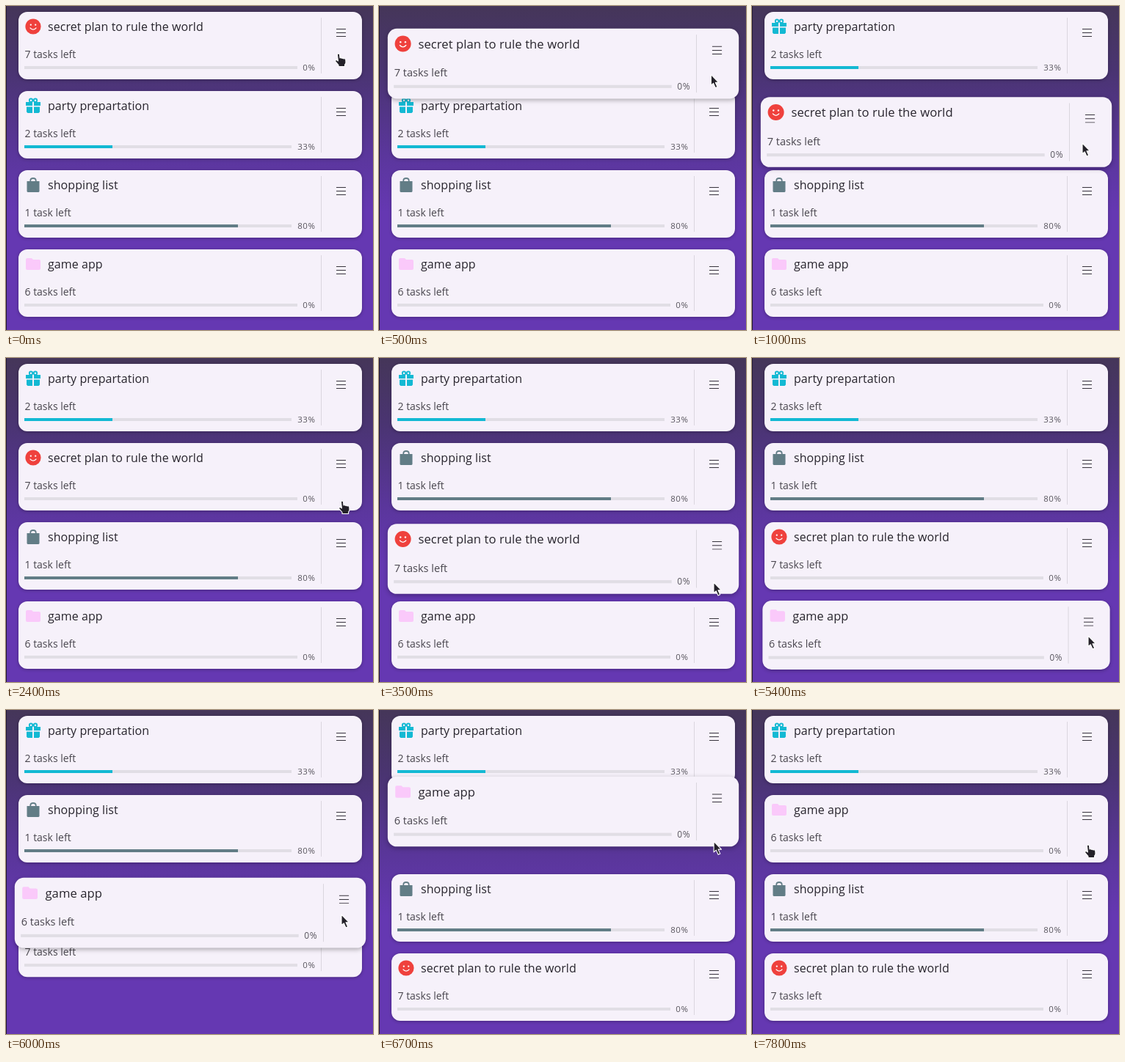
Recreate the animation shown at these times as an HTML page. Size 500 px wide and 442 px high, loop 7900 ms.

```html
<!DOCTYPE html>
<html lang="en">
<head>
<meta charset="utf-8">
<title>Reordering lists</title>
<style>
  html, body { margin: 0; width: 100%; height: 100%; overflow: hidden; }
  #stage {
    position: relative; width: 500px; height: 442px; overflow: hidden;
    font-family: "Open Sans", "Noto Sans", sans-serif;
    background: linear-gradient(#453659, #4a3472 90px, #5a369b 200px, #6538b2 280px, #6538b2);
  }
  #stage::before { content: ""; position: absolute; inset: 0 auto 0 0; width: 1px; background: #1f1733; }
  .card {
    position: absolute; top: 0; height: 92px; border-radius: 12px;
    background: #f6f1fa; white-space: nowrap;
  }
  .card > * { position: absolute; }
  .icon { left: 8px; top: 8px; width: 24px; height: 24px; fill: var(--tint); }
  .line { fill: none; stroke: var(--tint); stroke-width: 1.8; }
  .title { left: 40px; top: 0; font-size: 16px; line-height: 40px; letter-spacing: .06px; color: #28252d; }
  .left { left: 8.5px; top: 47px; font-size: 14px; line-height: 21px; color: #49464e; }
  .track { left: 8px; right: var(--end); top: 74px; height: 4px; background: #e1dee5; }
  .fill { height: 100%; width: var(--done); background: var(--tint); }
  .pct { right: 63.4px; top: 68px; font-size: 11.5px; line-height: 16px; letter-spacing: .6px; color: #59565e; }
  .rule { right: 55px; top: 8px; width: 1px; height: 76px; background: #dad6de; }
  .menu { right: 22px; top: 22px; width: 13px; height: 12px; stroke: #38353d; }
  #cursor { position: absolute; left: 0; top: 0; z-index: 5; overflow: visible; }
  #cursor path { fill: #242129; stroke: #fff; stroke-width: 1.1; stroke-linejoin: round; }
</style>
</head>
<body>
<div id="stage">
  <svg id="cursor" width="1" height="1">
    <path id="hand" d="M-1.6 1Q0-1 1.5 1L2 6Q3.3 4.9 4.5 6.4Q6 5.5 7 7Q9 6.2 9.8 8.2L10 12Q9.8 14 8.6 15V17.5H0V15.5L-4 10.8Q-4.8 8.6-2.7 8.4L-.6 10Z"/>
    <path id="arrow" d="M0 0V14.6L3.2 11.8L6 18L8.7 16.8L6 10.8H10.4Z"/>
  </svg>
</div>
<script>
const LOOP = 7900, STEP = 100;
const TOP = 8, PITCH = 108;
const LIFT = 200, SWAP = 345;

const icons = {
  smile: `<circle cx="12" cy="12" r="10.6"/>
    <g fill="#fff"><circle cx="8.8" cy="9.7" r="1.15"/><circle cx="15.2" cy="9.7" r="1.15"/></g>
    <path d="M7.6 13.6Q12 18.8 16.4 13.6" fill="none" stroke="#fff" stroke-width="1.3"/>`,
  gift: `<path d="M2 7H11V12H2ZM13 7H22V12H13ZM3 13.5H11V22H4.5L3 20.5ZM13 13.5H21V20.5L19.5 22H13Z"/>
    <circle class="line" cx="9" cy="4.7" r="2.2"/><circle class="line" cx="15" cy="4.7" r="2.2"/>`,
  bag: `<path d="M3.5 7H20.5V21L19.5 22H4.5L3.5 21Z"/>
    <path class="line" d="M8.3 8V6Q8.3 3 12 3T15.7 6V8"/>`,
  folder: `<path d="M4 4H10L12 6H20Q22 6 22 8V18Q22 20 20 20H4Q2 20 2 18V6Q2 4 4 4Z"/>`
};

const cards = {
  party: { slot: 1, icon: "gift", title: "party prepartation", left: "2 tasks left", done: 33, tint: "#13b9d3" },
  shopping: { slot: 2, icon: "bag", title: "shopping list", left: "1 task left", done: 80, tint: "#627d86" },
  secret: { slot: 0, icon: "smile", title: "secret plan to rule the world", left: "7 tasks left", done: 0, tint: "#ef413d" },
  game: { slot: 3, icon: "folder", title: "game app", left: "6 tasks left", done: 0, tint: "#fac9fa" }
};

// A dragged card overshoots its slot by `over` pixels and settles when dropped.
const drags = [
  { card: "secret", by: 1, start: 300, dur: 680, over: 10, drop: 1400 },
  { card: "secret", by: 1, start: 2600, dur: 600, over: 4, drop: 3600 },
  { card: "game", by: -2, start: 5500, dur: 1115, over: -23.5, drop: 7300 }
];

// Cards that step aside for a dragged one.
const swaps = [
  { card: "party", by: -1, start: 550 },
  { card: "shopping", by: -1, start: 2850 },
  { card: "secret", by: 1, start: 5840 },
  { card: "shopping", by: 1, start: 6150 }
];

const path = [
  { t: 0, x: 453, y: 65 }, { t: 300, x: 453, y: 69 }, { t: 980, x: 450, y: 187 },
  { t: 2400, x: 458, y: 195 }, { t: 2600, x: 458, y: 195 }, { t: 3200, x: 456, y: 306 },
  { t: 3700, x: 456, y: 306 }, { t: 4500, x: 423, y: 366 }, { t: 4900, x: 458, y: 379 },
  { t: 5500, x: 458, y: 379 }, { t: 6500, x: 456, y: 179 }, { t: 7800, x: 458, y: 184 }
];

function ease(t, start, dur) {
  const p = Math.min(1, Math.max(0, (t - start) / dur));
  return p * p * (3 - 2 * p);
}

const liftOf = (d, t) => ease(t, d.start - LIFT, LIFT) - ease(t, d.drop, LIFT);

const stage = document.getElementById("stage");
const cursor = document.getElementById("cursor");
const hand = document.getElementById("hand");
const arrow = document.getElementById("arrow");

Object.entries(cards).forEach(([name, card], i) => {
  const el = document.createElement("div");
  el.className = "card";
  el.style.zIndex = i;
  el.style.setProperty("--tint", card.tint);
  el.style.setProperty("--done", card.done + "%");
  el.style.setProperty("--end", card.done ? "96px" : "88px");
  el.innerHTML = `<svg class="icon" viewBox="0 0 24 24">${icons[card.icon]}</svg>
    <div class="title">${card.title}</div>
    <div class="left">${card.left}</div>
    <div class="track"><div class="fill"></div></div>
    <div class="pct">${card.done}%</div>
    <div class="rule"></div>
    <svg class="menu" viewBox="0 0 13 12"><path d="M0 1.5H13M0 6.5H13M0 11.5H13"/></svg>`;
  stage.append(el);
  card.el = el;
  card.drags = drags.filter(d => d.card === name);
  card.swaps = swaps.filter(s => s.card === name);
});

function drawCard(card, t) {
  let y = TOP + card.slot * PITCH, lift = 0;
  for (const s of card.swaps) y += s.by * PITCH * ease(t, s.start, SWAP);
  for (const d of card.drags) {
    y += (d.by * PITCH + d.over) * ease(t, d.start, d.dur) - d.over * ease(t, d.drop, LIFT);
    lift += liftOf(d, t);
  }
  const style = card.el.style;
  style.left = 17 + 4 * lift + "px";
  style.width = 468 - 8 * lift + "px";
  style.transform = `translateY(${y}px)` + (lift ? ` scale(${1 + .04 * lift})` : "");
  style.boxShadow = `0 ${1 + lift}px ${4 + 2 * lift}px rgba(0,0,0,.3)`;
}

function drawCursor(t) {
  let { x, y } = path[0];
  for (let i = 1; i < path.length; i++) {
    const a = path[i - 1], b = path[i], p = ease(t, a.t, b.t - a.t);
    x += (b.x - a.x) * p;
    y += (b.y - a.y) * p;
  }
  const dragging = drags.some(d => liftOf(d, t) > 0);
  cursor.style.transform = `translate(${x}px, ${y}px)`;
  hand.style.display = dragging ? "none" : "";
  arrow.style.display = dragging ? "" : "none";
}

const start = performance.now();
function tick() {
  const t = Math.floor((performance.now() - start) % LOOP / STEP) * STEP;
  Object.values(cards).forEach(card => drawCard(card, t));
  drawCursor(t);
  requestAnimationFrame(tick);
}
tick();
</script>
</body>
</html>
```
